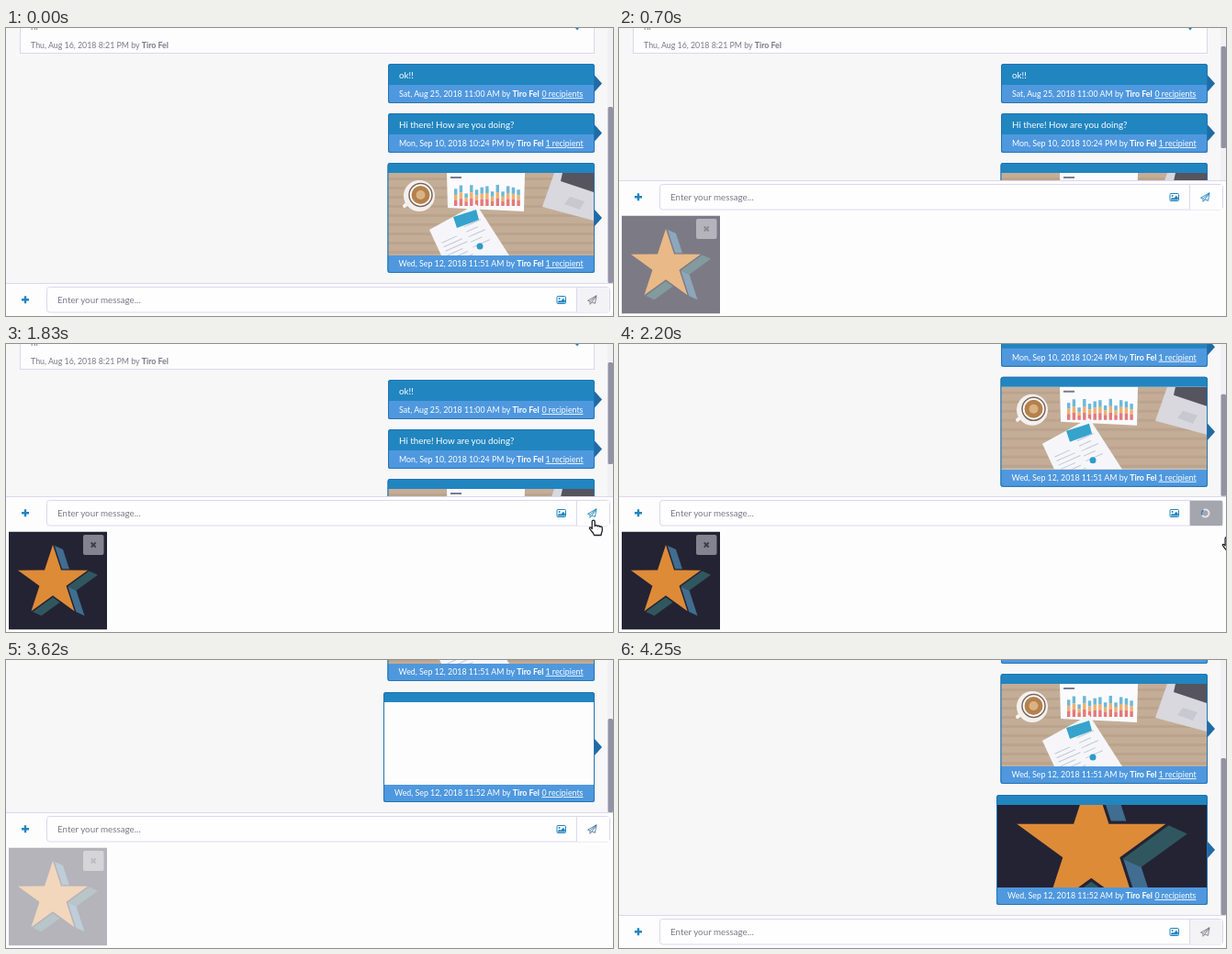
An HTML page that plays this animation: 661x314 px, repeating every 5250 ms.

```html
<!DOCTYPE html>
<html lang="en">
<head>
<meta charset="utf-8">
<title>Sending a picture in a chat</title>
<style>
  html, body { margin: 0; width: 100%; height: 100%; overflow: hidden; background: #fdfdfe; }
  svg { display: block; width: 661px; height: 314px; font: 9.8px Lato, sans-serif; }
  .meta { font-size: 8.82px; }
  .bold { font-weight: 700; }
  .white { fill: #fff; }
  .link { text-decoration: underline; }
</style>
</head>
<body>
<svg id="stage" viewBox="0 0 661 314" xmlns="http://www.w3.org/2000/svg"></svg>
<script>
const LOOP = 5250;
const SENDER = 'Tiro Fel';
const BLUE = '#2185c0', PAPER = '#fdfdfe', GREY = '#7a7a88', LINE = '#dad8ec';
const stage = document.getElementById('stage');

const poly = (points, fill, extra = '') => `<polygon points="${points}" fill="${fill}" ${extra}/>`;
const rect = (x, y, w, h, fill, extra = '') =>
  `<rect x="${x}" y="${y}" width="${w}" height="${h}" fill="${fill}" ${extra}/>`;
const metaText = (x, y, date, cls) =>
  `<text class="meta ${cls}" x="${x}" y="${y}">${date} by <tspan class="bold">${SENDER}</tspan></text>`;

function bubble({ left, top, height, footer, date, link, linkX, body }) {
  const width = 641 - left, mid = top + height / 2;
  return poly(`641,${mid - 9} 649,${mid} 641,${mid + 9}`, '#1f6ba6') +
    rect(left, top, width, height, BLUE, 'rx="2.5"') +
    rect(left, top + footer, width, height - footer, '#4f98de', 'rx="2"') +
    body +
    metaText(left + 12, top + height - 7, date, 'white') +
    `<text class="meta white link" x="${linkX}" y="${top + height - 7}">${link}</text>` +
    rect(left + .5, top + .5, width - 1, height - 1, 'none', 'rx="2.5" stroke="#2374b2"');
}

// Unit is the 107px thumbnail; the star sits slightly left of its centre.
function starPicture() {
  const dark = '#242333', blue = '#406d90', green = '#30575f';
  const corner = i => {
    const a = (i * 36 - 90) * Math.PI / 180, r = i % 2 ? 15.3 : 40;
    return [48 + r * Math.cos(a), 54.5 + r * Math.sin(a)];
  };
  const side = (i, fill) => {
    const [a, b] = [corner(i), corner(i + 1)];
    const shift = ([x, y]) => [x + 11, y + 5];
    return poly([a, b, shift(b), shift(a)].join(' '), fill);
  };
  const outline = Array.from({ length: 10 }, (_, i) => corner(i)).join(' ');
  return rect(0, 0, 107, 107, dark) +
    side(0, blue) + side(2, green) + side(3, blue) + side(5, green) +
    poly(outline, '#de8b38', `stroke="${dark}" stroke-width="3" paint-order="stroke"`);
}

// Desk with a cup, two papers and a laptop, 224 x 90.
function deskPicture() {
  let grain = '', bars = '', lines = '';
  for (let i = 0; i < 9; i++) grain += rect(0, 5 + i * 10, 224, 3, '#b39b84', 'opacity=".5"');
  for (let i = 0; i < 13; i++) {
    const x = 72 + i * 5.7, h = 13 + 10 * Math.abs(Math.sin(i * 1.3 + .6)), base = 36;
    bars += rect(x, base - h, 3.4, h * .35, '#6cb8d8') +
      rect(x, base - h * .65, 3.4, h * .3, '#f0b070') + rect(x, base - h * .35, 3.4, h * .35, '#e27a7c');
  }
  for (let i = 0; i < 6; i++) {
    lines += rect(4, 19 + i * 5, 18 + i % 3 * 4, 1, '#c3c8d6') + rect(33, 7 + i * 6, 14 + i % 2 * 6, 1, '#c3c8d6');
  }
  return rect(0, 0, 224, 90, '#c4ad97') + grain +
    `<path d="M24 31l-6 5" stroke="#f7f4f2" stroke-width="4" stroke-linecap="round"/>
     <circle cx="34" cy="25" r="17" fill="#f4f0ee"/>
     <circle cx="35.500" cy="24" r="12.500" fill="#fff" stroke="#7a6558" stroke-width="1.5"/>
     <circle cx="35.500" cy="24" r="10" fill="#b5804c"/><circle cx="35.500" cy="24" r="5" fill="#d9b283"/>` +
    poly('64,0 149,0 148,42 65,38', '#fbfbfd') + rect(68, 4, 12, 2, '#7a7c90') + bars +
    poly('58,90 45,62 96,34 132,90', '#f6f6fa') +
    `<g transform="translate(47 60) rotate(-24)">${lines}</g>
     <circle cx="100" cy="80" r="3.5" fill="#2f9bc8"/>` +
    poly('71,48 96,40 99,51 75,60', '#35a3cc') +
    poly('168,37 181,0 224,0 224,52', '#d8d8de') +
    poly('190,0 224,0 224,21 188,9', '#55545f') +
    poly('198,26 214,31 209,40 192,34', '#c8c8d0');
}

const chat = `
  ${rect(15.5, -40, 625, 67.5, PAPER, `stroke="${LINE}"`)}
  <text x="27" y="2" fill="${GREY}">hi</text>
  ${poly('620,0 624,0 622,2.6', BLUE)}
  <g fill="${GREY}">${metaText(27, 22, 'Thu, Aug 16, 2018 8:21 PM', '')}</g>
  ${bubble({ left: 416, top: 39, height: 43, footer: 23, date: 'Sat, Aug 25, 2018 11:00 AM',
    link: '0 recipients', linkX: 583.5, body: '<text class="white" x="428" y="55">ok!!</text>' })}
  ${bubble({ left: 416, top: 93, height: 43, footer: 23, date: 'Mon, Sep 10, 2018 10:24 PM',
    link: '1 recipient', linkX: 587.5, body: '<text class="white" x="428" y="109">Hi there! How are you doing?</text>' })}
  ${bubble({ left: 415.5, top: 147, height: 120, footer: 101, date: 'Wed, Sep 12, 2018 11:51 AM',
    link: '1 recipient', linkX: 587.5, body: rect(416, 158, 224, 90, PAPER) +
      `<g id="desk"><svg x="416" y="158" width="224" height="90">${deskPicture()}</svg></g>` })}
  <g id="sent">${bubble({ left: 411, top: 279, height: 120, footer: 101, date: 'Wed, Sep 12, 2018 11:52 AM',
    link: '0 recipients', linkX: 583.5, body: rect(412, 290, 228, 90, PAPER) +
      `<g id="sentStar"><svg x="412" y="290" width="228" height="90" viewBox="0 0 107 107"
        preserveAspectRatio="xMidYMid slice">${starPicture()}</svg></g>` })}</g>`;

// Panel coordinates start at its top border.
const panel = `
  ${rect(0, 0, 661, 320, PAPER)}
  ${rect(0, 0, 661, 1, LINE)}
  ${rect(44.5, 4.5, 613, 27.5, '#fefeff', `rx="3" stroke="${LINE}"`)}
  <path d="M17 18.3h8M21 14.3v8" stroke="${BLUE}" stroke-width="2.4"/>
  <text x="56" y="21.7" fill="${GREY}">Enter your message...</text>
  <rect x="600" y="14.5" width="9.5" height="8" rx="1" fill="none" stroke="${BLUE}"/>
  <circle cx="602.6" cy="17" r="1" fill="${BLUE}"/>
  ${poly('601,21.5 601,20.3 603,18.7 604.2,19.8 606.8,16.8 608.8,19 608.8,21.5', BLUE)}
  <rect id="button" x="622" y="5" width="35" height="27"/>
  ${rect(621, 5, 1, 27, LINE)}
  <path id="plane" d="M633.5 19.2L643 13.8l-1.6 8.6-3.4-1.5-2 2.4v-3.1zM636 20.2l7-6.4-5 7.1"
    fill="none" stroke-width=".9" stroke-linejoin="round"/>
  <g id="spinner" fill="none" stroke-width="2">
    <circle cx="638.5" cy="18.5" r="4" stroke="#e4e6ee"/>
    <path d="M638.5 14.5a4 4 0 0 1 4 4" stroke="#4f7ba4"/>
  </g>
  <g id="thumb">
    <svg x="3" y="38.5" width="107" height="107" viewBox="0 0 107 107">${starPicture()}</svg>
    ${rect(84, 42, 22.5, 22, '#84838f', 'rx="2"')}
    <path d="M92.7 50.5l5 5m0-5l-5 5" stroke="#3c3b48" stroke-width="1.8"/>
  </g>`;

stage.innerHTML = `
  ${rect(0, 0, 661, 314, '#f7f7f8')}
  <g id="chat">${chat}</g>
  ${rect(655, 0, 6, 314, '#f1f1f4')}
  <rect id="scrollbar" x="655.5" width="5.5" rx="1.5" fill="#9292a4"/>
  <g id="panel">${panel}</g>
  <path id="hand" d="M3.2 10V2.2C3.2.2 6.2.2 6.2 2.2V7c.4-1.4 2.8-1.1 2.8.3.6-1 2.7-.7 2.8.6.8-.8 2.5-.2 2.5 1.2
    v2.6c0 1.5-1.1 2.3-1.3 5.3H5.500C5.300 14.600 2 12.300.6 9.700c-.8-1.500 1-2.300 2.600.3z"
    fill="#fff" stroke="#1f1e2c" stroke-width="1.3" stroke-linejoin="round"/>`;

const part = {};
stage.querySelectorAll('[id]').forEach(el => part[el.id] = el);

const mix = (a, b, u) => a + (b - a) * u;
const span = (t, from, to) => Math.min(1, Math.max(0, (t - from) / (to - from)));
const ease = u => u < .5 ? 2 * u * u : 1 - 2 * (1 - u) ** 2;
const eased = (t, from, to) => ease(span(t, from, to));
function track(t, steps) {
  const i = steps.findIndex(([time]) => time > t);
  if (i < 0) return steps[steps.length - 1][1];
  if (i === 0) return steps[0][1];
  const [[t0, a], [t1, b]] = [steps[i - 1], steps[i]];
  return mix(a, b, (t - t0) / (t1 - t0));
}
const show = (el, on) => el.setAttribute('visibility', on ? 'visible' : 'hidden');
const move = (el, x, y) => el.setAttribute('transform', `translate(${x} ${y})`);

// The panel opens before its picture fades in, and closes after it has faded out.
const SEND = 1880, POST = 3300, CLOSE = 3780, DONE = 4000;
const THUMB_FADE = [[200, 0], [370, .33], [1030, .85], [1500, 1], [POST, 1], [CLOSE, 0]];
const HAND_X = [[700, 664], [920, 636.5], [1500, 636.5], [1650, 635], [2050, 635], [2250, 664]];
const HAND_Y = [[700, 250], [920, 191.5], [2050, 191.5], [2250, 216]];

function render(t) {
  const open = eased(t, 40, 300);
  const top = 278 - 112 * (open - eased(t, CLOSE, DONE));
  const posted = t >= POST;
  const scrolled = eased(t, SEND + 20, SEND + 340);
  const scroll = posted ? mix(112, 410 - top, eased(t, POST, POST + 320)) : 112 * scrolled;
  move(part.chat, 0, -scroll);
  move(part.panel, 0, top);

  const barHeight = posted ? top * .615 : mix(192, 111, open);
  const barTop = posted ? top - barHeight : mix(86, 20, open) + 35 * scrolled;
  part.scrollbar.setAttribute('y', barTop);
  part.scrollbar.setAttribute('height', barHeight);

  show(part.sent, posted);
  part.desk.setAttribute('opacity', t < CLOSE ? 1 : span(t, CLOSE, 4060));
  part.sentStar.setAttribute('opacity', span(t, 3850, 4200));
  part.thumb.setAttribute('opacity', track(t, THUMB_FADE));

  const loading = t >= SEND && t < POST;
  const ready = t >= 300 && t < DONE;
  part.button.setAttribute('fill', loading ? '#a5a5ae' : ready ? '#fefeff' : '#f3f3f6');
  part.plane.setAttribute('stroke', !ready ? GREY : t < POST ? BLUE : '#4a77a0');
  show(part.plane, !loading);
  show(part.spinner, loading);
  part.spinner.setAttribute('transform', `rotate(${t * .6} 638.5 18.5)`);

  show(part.hand, t >= 700 && t < 2250);
  move(part.hand, track(t, HAND_X), track(t, HAND_Y));
}

const start = performance.now();
function tick() {
  render((performance.now() - start) % LOOP);
  requestAnimationFrame(tick);
}
tick();
</script>
</body>
</html>
```
